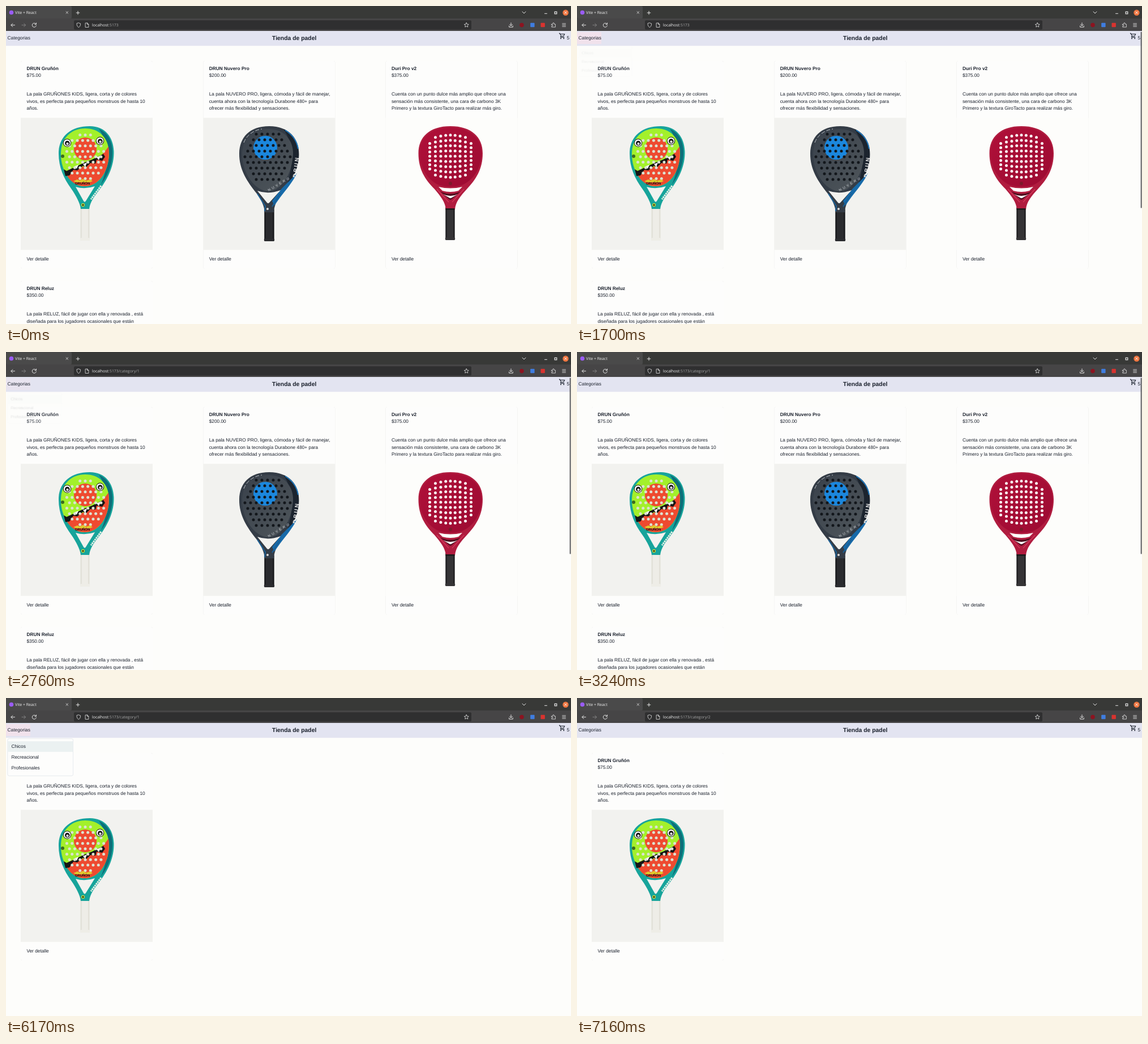
Animation, 998 px wide and 561 px high, one loop 8000 ms. Source, as an HTML page:

```html
<!DOCTYPE html>
<html lang="es">
<head>
<meta charset="utf-8">
<title>Tienda de padel</title>
<style>
html, body { margin: 0; width: 100%; height: 100%; overflow: hidden; background: #fdfdfb; }
svg { display: block; width: 998px; height: 561px; }
text { font: 8.32px "Liberation Sans", Arial, sans-serif; fill: #1a202c; text-rendering: geometricPrecision; white-space: pre; }
.b { font-weight: 700; }
.ui { font: 6.95px "Open Sans", "Noto Sans", sans-serif; fill: #f4f4f4; }
.dim { fill: #a6a6a6; }
.ic { fill: none; stroke: #e6e6e6; stroke-width: 1; stroke-linecap: round; stroke-linejoin: round; }
.card { fill: #fdfdfc; filter: drop-shadow(0 .7px .7px rgba(0,0,0,.14)); }
#menu { transform-origin: 3px 71.7px; opacity: 0; }
#tint, #bar { opacity: 0; }
.cat, .one, .two { fill-opacity: 0; }
</style>
</head>
<body>
<svg viewBox="0 0 998 561" id="stage"></svg>
<script>
const LOOP = 8000, SWAP = 4810;
const OPEN = [1670, 5800], PICK = [2690, 6650];

const text = (x, y, s, cls = '') => `<text x="${x}" y="${y}" class="${cls}">${s}</text>`;
const rect = (x, y, w, h, fill, r = 0, more = '') =>
  `<rect x="${x}" y="${y}" width="${w}" height="${h}" rx="${r}" fill="${fill}" ${more}/>`;
const disc = (x, y, r, fill) => `<circle cx="${x}" cy="${y}" r="${r}" fill="${fill}"/>`;
const path = (d, fill, more = '') => `<path d="${d}" fill="${fill}" ${more}/>`;
const icon = (d, more = '') => `<path class="ic" d="${d}" ${more}/>`;
const fade = (id, from, to) => `<linearGradient id="${id}" x1="0" y1="0" x2="1" y2="1">
  <stop stop-color="${from}"/><stop offset="1" stop-color="${to}"/></linearGradient>`;

// Staggered grid of holes kept inside an ellipse
function holes(cx, cy, rx, ry, dx, dy, r, fill) {
  let out = '';
  for (let j = -9; j <= 9; j++)
    for (let i = -9; i <= 9; i++) {
      const x = i * dx + (j & 1 ? dx / 2 : 0), y = j * dy;
      if ((x / rx) ** 2 + (y / ry) ** 2 <= 1) out += disc(cx + x, cy + y, r, fill);
    }
  return out;
}

// Square grid whose outer columns spread out and bow inwards
function bowedHoles(cx, cy, fill) {
  let out = '';
  for (let i = -4; i <= 4; i++)
    for (let j = -4; j <= 4; j++) {
      if (Math.abs(i) + Math.abs(j) > 7) continue;
      const x = i * 8 * (1 + 0.035 * Math.abs(i)), y = j * 9.3 * (1 - 0.012 * i * i);
      out += disc(cx + x, cy + y, 2.5, fill);
    }
  return out;
}

function grip(x, y, w, h, fill, edge) {
  return rect(x, y, w, h, fill, 2) + rect(x, y, 2.5, h, edge, 1.2) + rect(x + w - 2.5, y, 2.5, h, edge, 1.2)
    + rect(x - 0.7, y + h - 5, w + 1.4, 5, fill, 2);
}

const PAGE = '#fdfdfb', PAPER = '#f2f2ef';

function kidsRacket() {
  return grip(131.5, 354, 16, 60, '#eeede7', '#e2e1d9')
    + path('M148 212C177 212 191 234 190.500 260C190 288 176 311 160 331C152 341 148 350 147 358H132C131 348 124 335 115 322C102 304 92.500 284 93 258C94 230 114 212 148 212Z', '#17a49b')
    + path('M164 217C182 224 189 242 188 262C187 284 178 302 167 316C180 290 185 246 164 217Z', '#0d6f79')
    + path('M140 216C168 216 183 237 182 262C181 291 165 318 139 318C113 318 96 288 97 259C98 234 114 216 140 216Z', '#a3f02b')
    + path('M181 248C186 288 165 318 139 318C122 318 110 306 104 292C130 288 162 277 181 248Z', '#ee4a30')
    + disc(140, 252, 20, '#ee4a30')
    + path('M102 288L107 291L139 276L152 271L172 261L175 266L170 273L160 271L158 278L149 277L142 284L136 282L126 290L119 289L112 299L105 300Z', '#151515')
    + path('M121 283l4 4 3-7zM136 279l4 5 3-8zM160 267l4 5 3-8z', '#fff')
    + holes(140, 266, 36, 41, 9.3, 9.6, 2.5, '#dce3d2')
    + [[108, 241.5], [166, 238]].map(([x, y]) =>
        disc(x, y, 7.2, '#151515') + disc(x, y, 6.2, '#fff') + disc(x + .3, y + .5, 4.3, '#151515') + disc(x + .5, y + 1.5, 2.2, '#dedede')).join('')
    + disc(100, 265, 3, '#3c6b1f')
    + path('M119 309l7-3 4 2 6-3 5 3 8-2 4 3-5 2H124z', '#e2c92b')
    + `<text x="135" y="315" class="b" text-anchor="middle" style="font-size:6px;fill:#111">GRUÑÓN</text>`
    + path('M123 319Q139 324 157 318L141 344Q139 347 137 344Z', PAPER)
    + path('M168 317L150 341', 'none', 'stroke="#e6efe5" stroke-width="3" stroke-dasharray="3 1"')
    + disc(136, 351, 3, '#c9d832') + disc(136, 351, 1.6, '#222');
}

function darkRacket() {
  return grip(456.5, 358, 17, 57, '#2a2b2e', '#1b1c1f')
    + path('M465 212C500 212 518 234 517.500 262C517 290 503 313 487 331C478 342 474 352 473 364H457C456 352 451 342 443 331C426 310 411.500 288 412 260C412.500 232 430 212 465 212Z', '#343c46')
    + path('M490 217C510 226 518 244 517 264C516 286 506 306 494 322C508 286 510 246 490 217Z', '#1c242e')
    + path('M493 219C506 227 514 239 516 252', 'none', 'stroke="#1f78bd" stroke-width="2"')
    + path('M462 217C490 216 508 236 507 262C505 296 488 325 463 327C438 325 417 294 417 261C417 235 434 218 462 217Z', 'url(#slate)')
    + path('M514 295C506 311 494 325 484 338L474 352L470 344L487 322Z', '#176aa9')
    + disc(458, 250, 21, '#1b87dd')
    + holes(462, 266, 40, 49, 10, 10, 2.5, '#12161b')
    + path('M420 241C425 228 437 219 452 217', 'none', 'stroke="#c3c8cc" stroke-width="1" stroke-dasharray="7 3"')
    + `<text class="b" style="font-size:9.5px;fill:#eee;letter-spacing:2.6px" transform="translate(513 303) rotate(-83)">DRUN</text>`
    + `<text style="font-size:6px;fill:#d8dce0;letter-spacing:3.4px" transform="translate(464 327) rotate(-30)">NUVERO</text>`
    + path('M444 326Q463 333 485 325L465 347Q463 349 461 347Z', PAPER)
    + path('M444 331L458 353L457 362M485 330L470 354', 'none', 'stroke="#1b5f94" stroke-width="2"')
    + disc(462, 358, 2, '#d9d9d9');
}

function redRacket() {
  return grip(776.5, 354, 16, 59, '#353436', '#232224')
    + path('M785 212C822 212 842 231 842 260C842 288 830 306 814 323C802 336 794 346 793 359H777C776 346 768 336 757 323C740 306 728.500 288 728.500 260C728.500 231 748 212 785 212Z', '#b01c3f')
    + path('M785 214.500C820 214.500 840 233 840 260C840 287 824 310 802 317Q785 321 768 317C747 310 730.500 287 730.500 260C730.500 233 750 214.500 785 214.500Z', 'url(#wine)')
    + bowedHoles(785, 265, '#fbf4f5')
    + disc(785, 313, 3, '#7c1a2b')
    + path('M764 319Q785 324 806 319L799 326Q785 330 771 326Z', PAGE)
    + path('M767 327Q785 336 803 327L787 341Q785 342 783 341Z', '#4c0b1c')
    + path('M772 332Q785 338 798 332L786 339H784Z', PAGE)
    + path('M761 323L782 346M809 323L788 346', 'none', 'stroke="#d2375a" stroke-width="1.500"')
    + rect(776.5, 357, 16, 2.5, '#191919');
}

function card(x, y, name, price, lines, art = '', paper = PAPER) {
  return rect(x, y, 233, 366, '', 3, 'class="card"')
    + text(x + 10.4, y + 16.2, name, 'b') + text(x + 10.4, y + 27.8, price)
    + lines.map((s, i) => text(x + 10.4, y + 61 + i * 12.5, s)).join('')
    + rect(x, y + 100.3, 233, 233, paper) + art
    + text(x + 10.4, y + 352.2, 'Ver detalle');
}

const browser = rect(0, 0, 998, 22.5, '#383937') + rect(0, 0, 116, 22, '#4a4a4a', 2) + rect(0, 22, 998, 22, '#464546')
  + disc(9.5, 11.5, 3.8, '#9a5cf5') + text(16, 14, 'Vite + React', 'ui')
  + icon('M106 9.700l3.600 3.600m0-3.600l-3.600 3.600', 'style="stroke-width:.8"')
  + icon('M124.200 12h5.600M127 9.200v5.600')
  + icon('M912 10l3 3 3-3M951.500 13.300h4') + rect(969.2, 10.2, 3.6, 3.6, 'none', 0, 'stroke="#eee" stroke-width="1.200"')
  + disc(988.5, 11.7, 5.2, '#ef7640') + icon('M986.700 9.900l3.600 3.600m0-3.600l-3.600 3.600', 'style="stroke:#fff"')
  + icon('M15.500 33.700h-6.500m2.800-2.900l-2.900 2.900 2.900 2.900')
  + icon('M28 33.700h6.500m-2.800-2.900l2.900 2.900-2.900 2.900', 'style="stroke:#828282"')
  + icon('M52.700 31.500a3.600 3.600 0 1 0 .7 3M53.400 29.800v2.500h-2.500')
  + rect(120, 25.3, 702, 16.2, '#2f2f30', 2)
  + icon('M128.300 29.800l3.300 1.200c0 3.600-1 5.400-3.300 6.700c-2.300-1.300-3.300-3.100-3.300-6.700z', 'style="stroke-width:.8"')
  + icon('M140.500 30h3.200l2.200 2.200v5.300h-5.400zM143.500 30v2.400h2.400', 'style="stroke-width:.8"')
  + `<text x="152" y="36.100" class="ui">localhost<tspan class="dim">:5173</tspan><tspan class="dim cat">/category/</tspan><tspan class="dim one">1</tspan><tspan class="dim two" dx="-.572em">2</tspan></text>`
  + icon('M813.300 29.500l1.200 2.600 2.800.3-2.100 1.900.6 2.800-2.500-1.400-2.500 1.400.6-2.800-2.100-1.900 2.800-.3z', 'style="stroke-width:.8"')
  + icon('M892 29.700v5m-2.400-2.200l2.400 2.400 2.400-2.400M888.700 35v2.200h6.600v-2.200')
  + disc(911, 33.6, 3.8, '#8c1420') + rect(926.2, 29.8, 7.4, 7.4, '#3f7de0', 1) + rect(944.5, 29.8, 7.4, 7.4, '#d8332f', 1)
  + icon('M963.800 32h2v-1.200a1.200 1.200 0 0 1 2.400 0v1.200h2.200v5.200h-6.600v-1.800h1a1 1 0 0 0 0-2h-1z', 'style="stroke-width:.8"')
  + icon('M982.700 31h5.800m-5.800 2.600h5.800m-5.800 2.600h5.800', 'style="stroke-width:.9"');

const cart = path('M15.550 13c.75 0 1.410-.41 1.750-1.030L20.880 5.480A1 1 0 0 0 20 4H5.200l-.94-2H1v2h2l3.600 7.600-1.350 2.430C4.500 15.400 5.500 17 7 17h12v-2H7l1.100-2zM6.160 6h12.150l-2.760 5H8.530zM5 20a2 2 0 1 0 4 0a2 2 0 1 0-4 0M15 20a2 2 0 1 0 4 0a2 2 0 1 0-4 0',
  '#1a202c', 'fill-rule="evenodd" transform="translate(976.400 46.800) scale(.52)"');

const header = rect(0, 43.5, 998, 26.8, '#e3e4f1') + rect(0, 46, 43, 21, '#f1e2ec', 1, 'id="tint"')
  + text(2.6, 59.2, 'Categorias') + `<text x="470" y="59.900" class="b" style="font-size:10.4px">Tienda de padel</text>`
  + cart + text(990.6, 59.2, '5');

const others = card(348.3, 97, 'DRUN Nuvero Pro', '$200.00', [
    'La pala NUVERO PRO, ligera, cómoda y fácil de manejar,',
    'cuenta ahora con la tecnología Durabone 480+ para',
    'ofrecer más flexibilidad y sensaciones.'], darkRacket())
  + card(670.5, 97, 'Duri Pro v2', '$375.00', [
    'Cuenta con un punto dulce más amplio que ofrece una',
    'sensación más consistente, una cara de carbono 3K',
    'Primero y la textura GiroTacto para realizar más giro.'], redRacket(), PAGE)
  + card(26, 485, 'DRUN Reluz', '$350.00', [
    'La pala RELUZ, fácil de jugar con ella y renovada , está',
    'diseñada para los jugadores ocasionales que están']);

const menu = rect(3, 71.9, 115.5, 65.2, '', 2.5, 'stroke="#e2e8f0" stroke-width=".6" class="card"')
  + rect(3.3, 76.3, 114.9, 18.7, '#ebf1f1', 0, 'id="focus"')
  + ['Chicos', 'Recreacional', 'Profesionales'].map((s, i) => text(9.4, 88.2 + i * 18.7, s)).join('');

document.getElementById('stage').innerHTML =
  `<defs>${fade('slate', '#39414b', '#4f565b')}${fade('wine', '#b01039', '#9c0b32')}</defs>`
  + rect(0, 0, 998, 561, PAGE)
  + card(26, 97, 'DRUN Gruñón', '$75.00', [
    'La pala GRUÑONES KIDS, ligera, corta y de colores',
    'vivos, es perfecta para pequeños monstruos de hasta 10',
    'años.'], kidsRacket())
  + `<g id="others">${others}</g>` + header + browser
  + `<g id="menu">${menu}</g>` + rect(995.6, 45.5, 2.2, 311, '#6c6c6e', 1.1, 'id="bar"');

// Steps are [ms, style, easing towards the next step]; they hold by default
function play(sel, steps) {
  const frames = steps.map(([t, style, easing = 'steps(1)']) => ({ offset: t / LOOP, easing, ...style }));
  document.querySelector(sel).animate(frames, { duration: LOOP, iterations: Infinity });
}
const shown = { opacity: 1 }, hidden = { opacity: 0 };
const ink = v => ({ fillOpacity: v });
const shut = { opacity: 0, transform: 'scale(.8)' }, wide = { opacity: 1, transform: 'scale(1)' };

play('#menu', [[0, shut], ...OPEN.flatMap((t, i) => [
  [t, shut, 'cubic-bezier(.4,0,.2,1)'], [t + 200, wide],
  [PICK[i], wide, 'ease-out'], [PICK[i] + 100, shut]])]);
play('#tint', [[0, hidden], ...OPEN.flatMap((t, i) => [
  [t, shown], [PICK[i], shown, 'ease'], [PICK[i] + 200, hidden]])]);
play('#focus', [[0, { transform: 'translateY(0px)' }], [6400, { transform: 'translateY(18.7px)' }]]);
play('#bar', [[0, hidden], [110, hidden, 'linear'], [300, shown], [SWAP, hidden]]);
play('#others', [[0, shown], [SWAP, hidden]]);
play('.cat', [[0, ink(0)], [PICK[0], ink(1)]]);
play('.one', [[0, ink(0)], [PICK[0], ink(1)], [PICK[1], ink(0)]]);
play('.two', [[0, ink(0)], [PICK[1], ink(1)]]);
</script>
</body>
</html>
```
